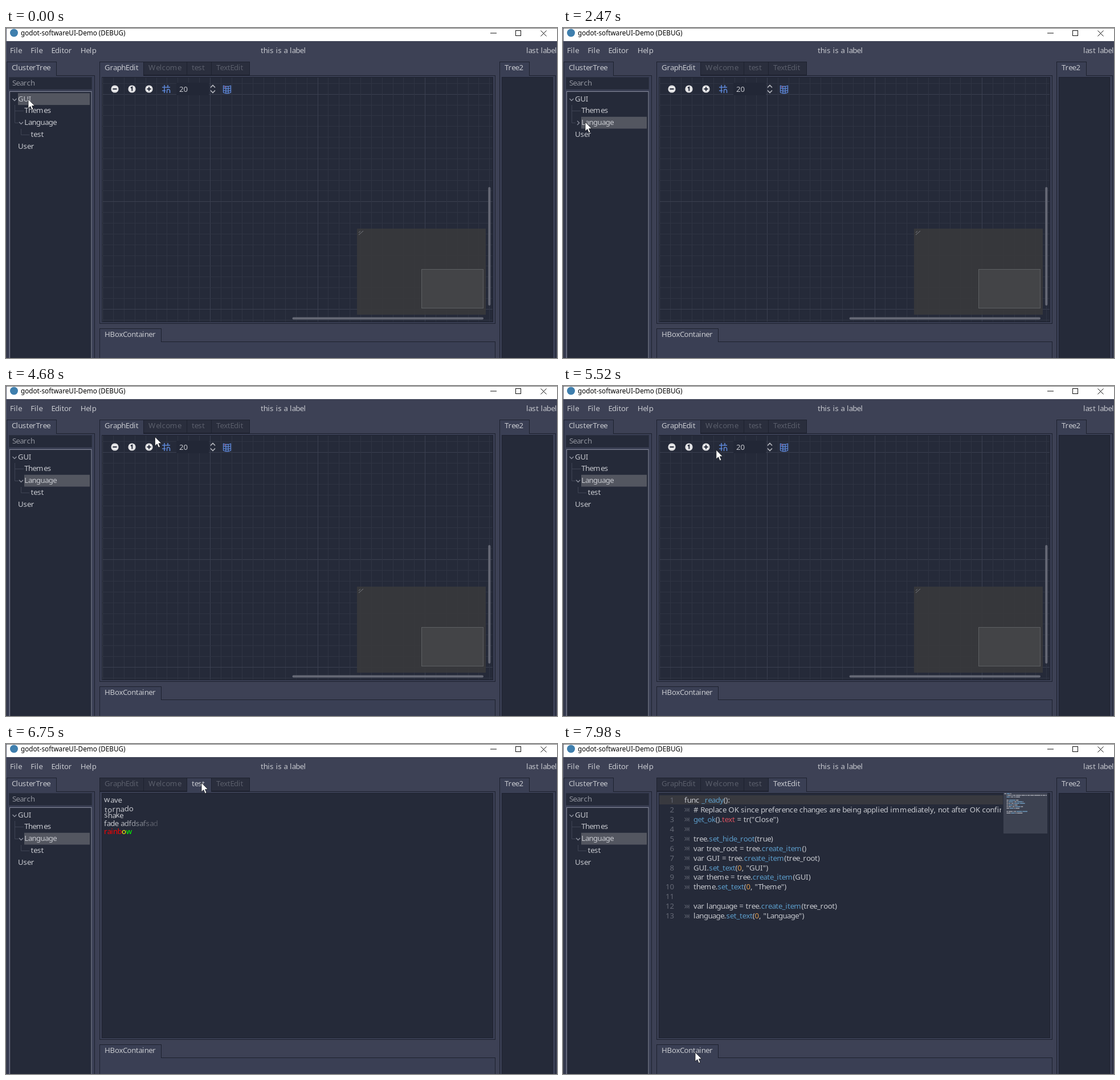
Write an HTML page with a canvas that moves like this. It is 967 px wide and 579 px high and loops after 8000 ms.

```html
<!DOCTYPE html>
<html lang="en">
<head>
<meta charset="utf-8">
<title>Software UI demo</title>
<style>
  html, body { margin: 0; width: 100%; height: 100%; overflow: hidden; background: #3d4155; }
  canvas { display: block; }
</style>
</head>
<body>
<canvas id="stage" width="967" height="579"></canvas>
<script>
const ctx = document.getElementById('stage').getContext('2d');
const LOOP = 8000, STEP = 120, SCALE = 0.943;
const FONT = '"Noto Sans", sans-serif';
const C = {
  base: '#3d4155', panel: '#3a3f54', dark: '#252a39', edge: '#1d212e',
  idle: '#2a2e3d', text: '#c6c8ce', dim: '#5a5e6b', guide: '#3f4454', blue: '#5d86d6'
};
const LABELS = ['GraphEdit', 'Welcome', 'test', 'TextEdit'];
const TAB_X = [164, 241, 317, 360, 427];
const CLICK = { themes: 480, collapse: 1940, language: 2470, expand: 3250, welcome: 5760, test: 6630, edit: 7110 };

// Each drag of the pointer continues from where the last one ended.
const REST = [39, 125];
const MOVES = [
  { at: 120, steps: 3, to: [[58, 146]] },
  { at: 730, steps: 3, to: [[71, 167]] },
  { at: 1220, steps: 6, to: [[28, 165]] },
  { at: 2200, steps: 2, to: [[39, 165]] },
  { at: 2590, steps: 2, to: [[35, 165]] },
  { at: 3010, steps: 5, to: [[28, 165], [29, 180]] },
  { at: 4080, steps: 7, to: [[250, 47], [266, 106]] },
  { at: 4920, steps: 7, to: [[246, 225], [278, 67]] },
  { at: 5880, steps: 4, to: [[306, 55], [343, 68]] },
  { at: 6870, steps: 5, to: [[390, 70], [445, 118]] },
  { at: 7500, steps: 5, to: [[528, 385], [232, 541]] }
];

const CODE = [
  'func _ready():',
  '\t# Replace OK since preference changes are being applied immediately, not after OK confirmation',
  '\tget_ok().text = tr("Close")',
  '\t',
  '\ttree.set_hide_root(true)',
  '\tvar tree_root = tree.create_item()',
  '\tvar GUI = tree.create_item(tree_root)',
  '\tGUI.set_text(0, "GUI")',
  '\tvar theme = tree.create_item(GUI)',
  '\ttheme.set_text(0, "Theme")',
  '',
  '\tvar language = tree.create_item(tree_root)',
  '\tlanguage.set_text(0, "Language")'
];

const clamp = v => Math.max(0, Math.min(1, v));
const lerp = (a, b, u) => a + (b - a) * u;

function box(x, y, w, h, fill, stroke) {
  if (fill) { ctx.fillStyle = fill; ctx.fillRect(x, y, w, h); }
  if (stroke) {
    ctx.strokeStyle = stroke; ctx.lineWidth = 1;
    ctx.strokeRect(x + 0.5, y + 0.5, w - 1, h - 1);
  }
}

// Strokes an SVG path placed at x, y.
function stroke(path, x, y, color, width = 1) {
  ctx.save();
  ctx.translate(x, y);
  ctx.strokeStyle = color; ctx.lineWidth = width;
  ctx.stroke(new Path2D(path));
  ctx.restore();
}

function disc(x, y, r, color) {
  ctx.fillStyle = color;
  ctx.beginPath(); ctx.arc(x, y, r, 0, 7); ctx.fill();
}

// Whole-pixel advances of a hinted 14 px face, shown at the window scale.
const advances = {};
function advance(ch) {
  if (!(ch in advances)) {
    ctx.font = '14px ' + FONT;
    const w = ctx.measureText(ch).width;
    const fit = w < 7.5 ? Math.round : w > 10.5 ? Math.ceil : Math.floor;
    advances[ch] = fit(w) * SCALE;
  }
  return advances[ch];
}
const widthOf = s => [...s].reduce((sum, ch) => sum + advance(ch), 0);

// An effect may return dx, dy, color and alpha for each character.
function text(s, x, y, color = C.text, effect = () => ({})) {
  const start = x;
  [...s].forEach((ch, i) => {
    const step = advance(ch);
    const { dx = 0, dy = 0, alpha = 1, color: own = color } = effect((x - start) / SCALE, i);
    ctx.font = 14 * SCALE + 'px ' + FONT;
    ctx.globalAlpha = alpha;
    ctx.fillStyle = own;
    ctx.fillText(ch, x + dx, y + dy);
    x += step;
  });
  ctx.globalAlpha = 1;
  return x;
}

function tab(x, right, y, label, active) {
  box(x, y, right - x + 1, 24, active ? C.panel : C.idle, C.edge);
  if (active) box(x + 1, y + 22, right - x - 1, 3, C.panel);
  text(label, x + 9, y + 15.4, active ? C.text : C.dim);
}

function titleBar() {
  box(0, 0, 967, 23, '#fff');
  box(0, 0, 967, 1, '#777');
  disc(14, 8.5, 7, '#3f7fae');
  ctx.font = '11.7px ' + FONT;
  ctx.fillStyle = '#000';
  ctx.fillText('godot-softwareUI-Demo (DEBUG)', 26, 13);
  stroke('M0 5H11', 850, 4, '#111');
  box(894, 4, 10, 10, null, '#111');
  stroke('M0 0L10 10M10 0L0 10', 938.5, 4.5, '#111');
}

function chevron(x, y, open) {
  stroke(open ? 'M-3.5-1.5L0 2L3.5-1.5' : 'M-1.5-3.5L2 0L-1.5 3.5', x, y, '#9093a0', 1.3);
}

function treePanel(t) {
  box(1, 83, 155, 500, C.panel, C.edge);
  tab(1, 88, 59, 'ClusterTree', true);
  box(5, 86, 146, 22, C.dark, '#2b3040');
  text('Search', 11, 101, '#90939d');
  box(6, 111, 144.5, 480, C.dark, '#8a8ea0');

  const open = t < CLICK.collapse || t >= CLICK.expand;
  const names = ['GUI', 'Themes', 'Language', ...(open ? ['test'] : []), 'User'];
  const depth = { Themes: 1, Language: 1, test: 2 };
  const rowX = name => 21 + 11.3 * (depth[name] || 0);
  const rowH = 22 * SCALE, rowY = i => 124.5 + rowH * i;
  const chosen = t < CLICK.themes ? 0 : t < CLICK.language ? 1 : 2;
  const left = Math.floor(rowX(names[chosen]));
  box(left, rowY(chosen) - 10.2, 147 - left, rowH, '#535660');

  stroke('M0-10.5V21H6.5M0 0H15.5', 15.5, 145.5, C.guide);
  if (open) stroke('M0-10.5V0H14.5', 26.5, 187.5, C.guide);
  chevron(15, 125.5, true);
  chevron(26.5, 166.5, open);
  names.forEach((name, i) => text(name, rowX(name), Math.floor(rowY(i) + 4.7)));
}

function frameUI(active) {
  box(0, 0, 967, 579, C.base);
  titleBar();
  let x = 7;
  for (const item of ['File', 'File', 'Editor', 'Help']) x = text(item, x, 44.3) + 15.5;
  text('this is a label', 447, 44.3);
  text('last label', 913, 44.3);

  box(164, 83, 695, 436, C.panel, C.edge);
  LABELS.forEach((s, i) => tab(TAB_X[i], TAB_X[i + 1], 59, s, i === active));
  box(168, 86, 687, 430, C.dark, C.edge);

  box(164, 550, 695, 40, C.panel, C.edge);
  tab(164, 272, 527, 'HBoxContainer', true);

  box(866, 83, 99, 500, C.panel, C.edge);
  tab(866, 918, 59, 'Tree2', true);
  box(870, 86, 90, 500, C.dark, C.edge);
}

function grid() {
  const cell = 20 * SCALE;
  const shade = major => major ? '#3b4050' : '#2f3443';
  for (let i = 0; i < 37; i++) {
    const x = Math.floor(169.8 + i * cell), y = Math.floor(97.3 + i * cell);
    if (x < 854) box(x, 87, 1, 428, shade(i % 10 === 0));
    if (y < 515) box(169, y, 685, 1, shade(i % 10 === 1));
  }
}

function toolbar() {
  const y = 107;
  ['M-3.5 0H3.5', 'M-2-2L.3-3.2V3.5', 'M-3.5 0H3.5M0-3.5V3.5'].forEach((sign, i) => {
    disc(191 + 30 * i, y, 6.6, '#e3e3e5');
    stroke(sign, 191 + 30 * i, y, C.dark, 2);
  });
  stroke('M-3-7V7M3-7V-2M-7-3H7M-7 3H-1M1.5 7V3a2.5 2.5 0 0 1 5 0V7', 281, y, C.blue, 1.6);

  box(299, 96, 57, 22, '#222736');
  text('20', 304, 111.7);
  stroke('M-4-2.5L0-6.5L4-2.5M-4 2.5L0 6.5L4 2.5', 363, y, '#b7b9c0', 1.6);

  for (let i = 0; i < 4; i++) {
    stroke('M-7-1L-2.5.5H2.5L7-1', 388, 102 + 4 * i, C.blue, 1.3);
    stroke('M0 0V12', 381.5 + 4.3 * i, i % 3 ? 102 : 101, C.blue, 1.4);
  }
  stroke('M0 2.5L3 0', 383, 102, '#a25a80', 1.3);
}

function graphView() {
  grid();
  toolbar();
  box(616, 352, 226, 151, 'rgba(56,57,59,.9)');
  box(729, 423, 109, 69, '#434447', '#5d5f62');
  stroke('M0 7L8 0M0 3L3 .5', 619, 356, '#777980');
  ctx.fillStyle = '#656875';
  ctx.beginPath();
  ctx.roundRect(502.5, 507.5, 335.5, 4, 2);
  ctx.roundRect(846.3, 279, 4, 208, 2);
  ctx.fill();
}

// Baselines of the rich-text pages.
const richLine = (first, i) => first + 15 * SCALE * i;

function welcomeView() {
  const y = i => richLine(114.8, i);
  text('Client for jop', 187, y(0));
  text('This is the client for jop, based on Godot.', 202, y(1));
  const x = text('More info click ', 202, y(2));
  const end = text('here', x, y(2));
  box(x, 144, end - x, 1, C.text);
}

// Oversaturated HSV, so the clamped result is nearly pure bands.
function rainbow(hue) {
  const channel = n => {
    const k = (n + hue * 6) % 6;
    return Math.round(255 * clamp(20 - 200 * Math.max(0, Math.min(k, 4 - k, 1))));
  };
  return `rgb(${channel(5)},${channel(3)},${channel(1)})`;
}

function noise(n) {
  const v = Math.sin(n * 127.1) * 43758.5453;
  return v - Math.floor(v) - 0.5;
}

function effectsView(t) {
  const tick = Math.floor((t - CLICK.test) / STEP);
  const s = tick * STEP / 1000;
  const effects = {
    'wave': x => ({ dy: 2 * SCALE * Math.sin(5 * s + x / 50) }),
    'tornado': x => ({
      dx: 5 * SCALE * Math.sin(2 * s + x / 50),
      dy: 5 * SCALE * Math.cos(2 * s + x / 50)
    }),
    'shake': (x, i) => ({ dx: noise(tick * 17 + i + 1), dy: noise(tick * 31 + i + 9) }),
    'fade adfdsafsad': (x, i) => ({ alpha: clamp((18 - i) / 14) }),
    'rainbow': x => ({ color: rainbow(0.2 * (s + x / 50)) })
  };
  Object.entries(effects).forEach(([word, effect], i) => text(word, 172, richLine(101.2, i), C.text, effect));
}

const TOKENS = /\w*_\w+(?=\()|(?<=\.)text(?= )|\b0\b/g;
function tokenColor(token) {
  return token === '0' ? '#dc9d52' : token === 'text' ? '#d9505f' : '#5b9bc8';
}

function codeLine(s, x, y) {
  let last = 0;
  for (const m of s.matchAll(TOKENS)) {
    x = text(s.slice(last, m.index), x, y);
    x = text(m[0], x, y, tokenColor(m[0]));
    last = m.index + m[0].length;
  }
  text(s.slice(last), x, y);
}

function codeView() {
  const rowH = 18 * SCALE;
  box(169, 90, 603, 16, '#38393f');
  ctx.save();
  ctx.beginPath(); ctx.rect(169, 87, 600, 428); ctx.clip();
  CODE.forEach((source, i) => {
    const y = 102.7 + rowH * i, number = String(i + 1);
    const indented = source[0] === '\t';
    text(number, 195 - widthOf(number), y, '#646875');
    if (indented) stroke('M0-3L3 0L0 3M3.5-3L6 0L3.5 3M7.5-3.5V3.5', 213.5, y - 4.2, '#5c606d', 1.1);
    codeLine(source.trim(), indented ? 229 : 213, y);
  });
  ctx.restore();
  codeMap();
}

function codeMap() {
  const charW = 0.87, right = 849;
  box(773, 86, 77, 71, '#3d4251');
  CODE.forEach((source, i) => {
    const left = source[0] === '\t' ? 778.5 : 774.5;
    for (const { 0: word, index } of source.trim().matchAll(/[^\s.(]+/g)) {
      const x = left + index * charW;
      const w = Math.min(word.length * charW, right - x);
      if (w > 0) box(x, 86.5 + i * 2.83, w, 1.5, word.includes('_') ? '#6f9bbd' : '#a6a9b2');
    }
  });
}

// The pointer advances in whole steps along evenly timed legs.
function pointerAt(t) {
  let from = REST;
  for (const { at, steps, to } of MOVES) {
    if (t < at) break;
    const legs = [from, ...to];
    const u = clamp((Math.floor((t - at) / STEP) + 1) / steps) * to.length;
    const i = Math.min(Math.floor(u), to.length - 1);
    from = legs[i].map((v, axis) => lerp(v, legs[i + 1][axis], u - i));
  }
  return from;
}

const ARROW = new Path2D('M0 0V16L3.8 12.6L6.3 18.8L9 17.6L6.5 11.7L11.4 11.5Z');
function pointer(t) {
  ctx.save();
  ctx.translate(...pointerAt(t));
  ctx.fillStyle = '#fff'; ctx.fill(ARROW);
  ctx.strokeStyle = '#15171d'; ctx.lineWidth = 0.8; ctx.stroke(ARROW);
  ctx.restore();
}

const VIEWS = [graphView, welcomeView, effectsView, codeView];
function draw(t) {
  const active = [CLICK.welcome, CLICK.test, CLICK.edit].filter(at => t >= at).length;
  frameUI(active);
  treePanel(t);
  VIEWS[active](t);
  box(0, 0, 1, 579, '#55586a');
  pointer(t);
}

const origin = performance.now();
function tick() {
  draw((performance.now() - origin) % LOOP);
  requestAnimationFrame(tick);
}
tick();
</script>
</body>
</html>
```
